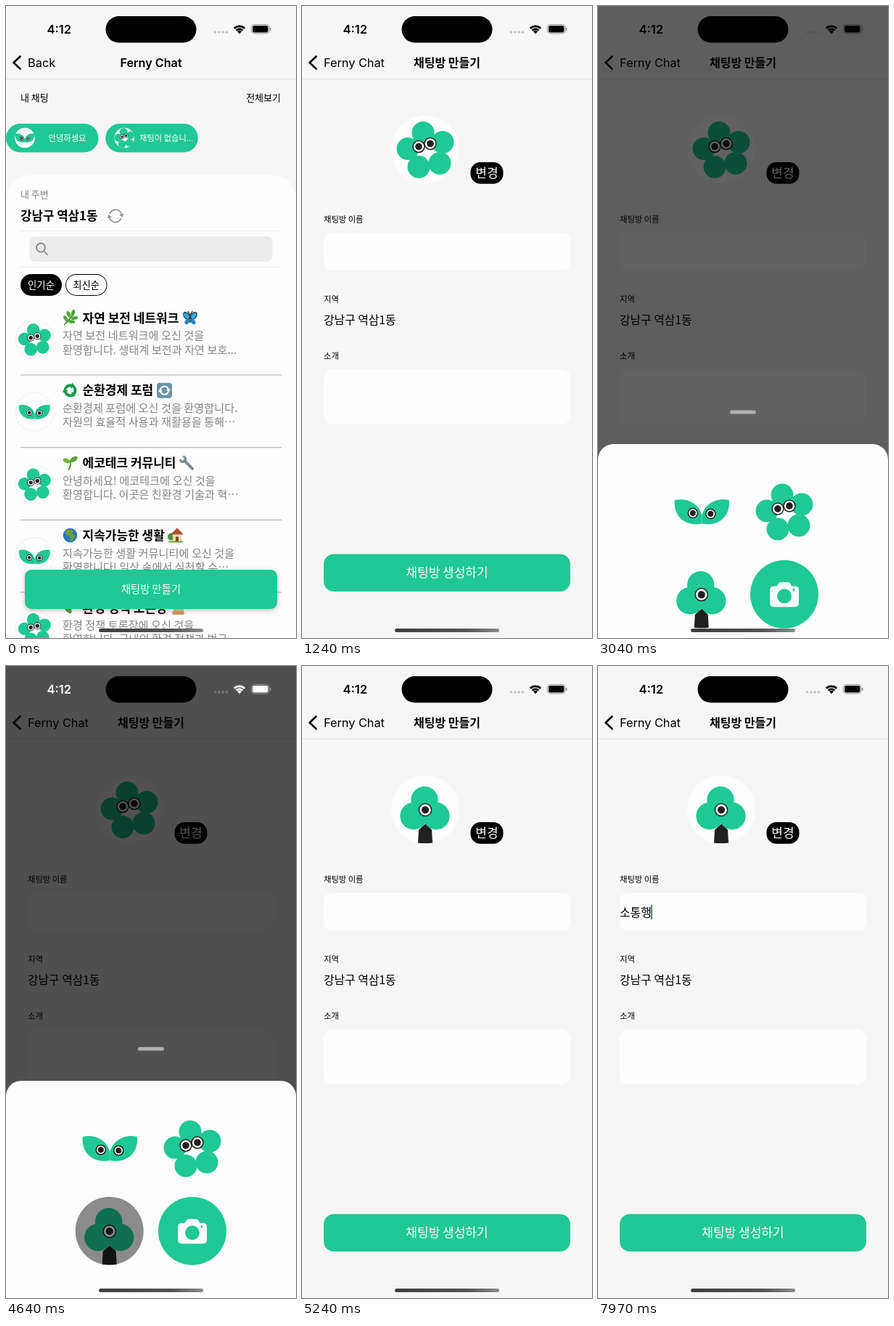
An HTML page with a canvas that plays this animation: 400x870 px, repeating every 8000 ms.

```html
<!DOCTYPE html>
<html lang="ko">
<head>
<meta charset="utf-8">
<title>Ferny Chat</title>
<style>
  html, body { margin: 0; width: 100%; height: 100%; overflow: hidden; background: #f6f6f6; }
  canvas { display: block; width: 400px; height: 870px; }
</style>
</head>
<body>
<canvas id="stage"></canvas>
<script>
const W = 400, H = 870, LOOP = 8000, STEP = 1000 / 15;
const BG = '#f6f6f6', PAPER = '#fdfdfd', GREEN = '#1fc894', GREY = '#868686', DARK = '#20201f';
const APP = 'Ferny Chat', PLACE = '강남구 역삼1동';
const KOREAN = '"Noto Sans CJK KR", "Noto Sans CJK JP", "Noto Sans CJK"';

const canvas = document.getElementById('stage');
const c = canvas.getContext('2d');
const ratio = window.devicePixelRatio || 1;
canvas.width = W * ratio;
canvas.height = H * ratio;

// ---------- helpers ----------
const clamp = v => Math.max(0, Math.min(1, v));
const ramp = (t, a, b) => clamp((t - a) / (b - a));
const mix = (a, b, p) => a + (b - a) * p;

// critically damped spring, 0 to 1
function spring(ms, speed) {
  const x = Math.max(0, ms) * speed / 1000;
  return 1 - (1 + x) * Math.exp(-x);
}

function group(x, y, draw, scale = 1, alpha = 1) {
  c.save();
  c.translate(x, y);
  c.scale(scale, scale);
  c.globalAlpha *= alpha;
  draw();
  c.restore();
}

function box(x, y, w, h, r, fill) {
  c.beginPath();
  c.roundRect(x, y, w, h, r);
  c.fillStyle = fill;
  c.fill();
}

function dot(x, y, r, fill) {
  c.beginPath();
  c.arc(x, y, r, 0, 7);
  c.fillStyle = fill;
  c.fill();
}

function oval(x, y, rx, ry, turn, fill) {
  c.beginPath();
  c.ellipse(x, y, rx, ry, turn, 0, 7);
  c.fillStyle = fill;
  c.fill();
}

function shape(d, fill) {
  c.fillStyle = fill;
  c.fill(new Path2D(d));
}

function stroke(d, color, width) {
  c.strokeStyle = color;
  c.lineWidth = width;
  c.lineCap = c.lineJoin = 'round';
  c.stroke(new Path2D(d));
}

function setFont(s, size, weight) {
  const fonts = /[ㄱ-힣]/.test(s) ? `${KOREAN}, Inter` : `Inter, ${KOREAN}`;
  c.font = `${weight} ${size}px ${fonts}, sans-serif`;
}

// y is the visual middle of the line
function text(s, x, y, size, color = '#000', weight = 400, align = 'left') {
  setFont(s, size, weight);
  c.textAlign = align;
  c.fillStyle = color;
  c.fillText(s, x, y + size * 0.37);
}

function arrows(count, r, color, width, head) {
  for (let i = 0; i < count; i++) {
    const span = 2 * Math.PI / count - 0.55;
    c.save();
    c.rotate(i * 2 * Math.PI / count - 2.8);
    c.beginPath();
    c.arc(0, 0, r, 0, span);
    c.strokeStyle = color;
    c.lineWidth = width;
    c.lineCap = 'butt';
    c.stroke();
    c.rotate(span);
    shape(`M${r - head} -.5 L${r + head} -.5 L${r} ${head * 1.3}Z`, color);
    c.restore();
  }
}

// ---------- characters, each around the centre of a 47 px circle ----------
function eye(x, y, r) {
  dot(x, y, r, DARK);
  dot(x, y, r - 1.5, '#fff');
  dot(x, y, r * 0.55, DARK);
}

function flower() {
  [[-3, -23], [24, -10], [20, 19], [-9, 24], [-24, -1]].forEach(([x, y]) => dot(x, y, 15.5, GREEN));
  eye(-9, -4, 8.7);
  eye(7, -8, 8.7);
}

function leaf() {
  const half = 'M-37.5 -16 C-20 -20 -4 -11 0 5 L0 16.5 C-20 21 -40 9 -37.5 -16Z';
  shape(half, GREEN);
  c.save();
  c.scale(-1, 1);
  shape(half, GREEN);
  c.restore();
  eye(-12.5, 2, 7.3);
  eye(12, 3, 7.3);
}

function tree() {
  [[-1, -13], [-16, 9], [15, 9]].forEach(([x, y]) => dot(x, y, 18.7, GREEN));
  dot(0, 2, 9, GREEN);
  shape('M0 20 L9 28 L10 46 Q0 47 -10 46 L-9 28Z', DARK);
  eye(0, 0.5, 9.3);
}

function camera() {
  dot(0, 0, 47, GREEN);
  box(-20, -11, 40, 28.5, 5, '#fff');
  shape('M-11 -10 L-8 -15 Q-7 -16.5 -5 -16.5 L5 -16.5 Q7 -16.5 8 -15 L11 -10Z', '#fff');
  dot(0, 2.5, 10, GREEN);
  dot(13, -6, 1.7, GREEN);
}

// ---------- small pictures beside the room names ----------
const icons = {
  herb() {
    stroke('M-8 9 Q-1 3 6 -8', '#3f8a2c', 1.6);
    [[-6, 1, 1], [-2, -5, 1.1], [4, -7, 1.9], [2, 5, 0.1], [6, 0, -0.2]]
      .forEach(([x, y, turn]) => oval(x, y, 4.8, 2.3, turn, '#4fa335'));
  },
  butterfly() {
    [-1, 1].forEach(s => {
      oval(s * 5, -3, 6.2, 4, s * -0.9, '#17344d');
      oval(s * 5, -3, 4.8, 2.8, s * -0.9, '#39a9e6');
      oval(s * 4, 5, 4.2, 2.9, s * 0.9, '#2784c4');
    });
    stroke('M0 -3 L0 6 M0 -4 L-3 -9 M0 -4 L3 -9', '#222', 1.3);
  },
  recycle() { arrows(3, 7, '#159a45', 4, 4); },
  renew() {
    box(-10.5, -10.5, 21, 21, 4, '#6b93a8');
    arrows(2, 5.6, '#fff', 2, 3);
  },
  sprout() {
    stroke('M-2 9 Q2 3 0 -2', '#5c9a2e', 2);
    oval(-5, -3, 5.2, 3, 0.4, '#6fb63a');
    oval(5, -5, 5.8, 3.2, -0.6, '#58a52f');
  },
  wrench() {
    stroke('M-3 -3 L8 8', '#788892', 4);
    c.beginPath();
    c.arc(-5, -5, 3.7, -1.2, 2.8);
    c.strokeStyle = '#788892';
    c.lineWidth = 3;
    c.stroke();
  },
  globe() {
    dot(0, 0, 9.8, '#2d78bd');
    shape('M-6 -7 Q0 -10 4 -6 L3 -2 L7 1 L3 8 L0 7 L-1 1 L-6 0Z', '#6aa23c');
  },
  home() {
    dot(-6, 2, 5, '#4c963a');
    box(-4, -2, 12, 11, 0, '#efdaae');
    shape('M-7 -1 L2 -10 L11 -1Z', '#a8522d');
    box(0, 2, 4, 7, 0, '#7b482d');
    box(-10, 8, 20, 2, 1, '#67a440');
  },
  leaves() {
    oval(-3, 2, 7, 3.6, 0.9, '#5c9f36');
    oval(5, -4, 5, 2.6, -0.7, '#79b94c');
  },
  scroll() {
    box(-7, -9, 14, 18, 2, '#e5c58e');
    box(-9, 5, 17, 4.5, 2, '#c69a5d');
    stroke('M-4 -5 H4 M-4 -1 H4', '#9b7442', 1);
  }
};

const rooms = [
  ['herb', '자연 보전 네트워크', 'butterfly', 254, '자연 보전 네트워크에 오신 것을', '환영합니다. 생태계 보전과 자연 보호...'],
  ['recycle', '순환경제 포럼', 'renew', 218.5, '순환경제 포럼에 오신 것을 환영합니다.', '자원의 효율적 사용과 재활용을 통해⋯'],
  ['sprout', '에코테크 커뮤니티', 'wrench', 249, '안녕하세요! 에코테크에 오신 것을', '환영합니다. 이곳은 친환경 기술과 혁⋯'],
  ['globe', '지속가능한 생활', 'home', 234, '지속가능한 생활 커뮤니티에 오신 것을', '환영합니다! 일상 속에서 실천할 수⋯'],
  ['leaves', '환경 정책 토론장', 'scroll', 238, '환경 정책 토론장에 오신 것을', '환영합니다. 국내외 환경 정책과 법규⋯']
];

// ---------- screens ----------
function chatPill(x, face, scale, label, labelX) {
  box(x, 162, 127.5, 39.5, 19.7, GREEN);
  group(x + 26, 181.5, () => {
    c.beginPath();
    c.arc(0, 0, 14, 0, 7);
    c.clip();
    dot(0, 0, 14, PAPER);
    c.scale(scale, scale);
    face();
  });
  text(label, labelX, 182, 11.3, '#fff');
}

function roomRow([left, name, right, rightX, line1, line2], i) {
  const y = 429.5 + i * 99.7;
  group(39.3, y + 29.5, () => {
    dot(0, 0, 47, '#e9e9e9');
    dot(0, 0, 46, PAPER);
    (i % 2 ? leaf : flower)();
  }, 0.57);
  group(88.5, y, icons[left]);
  text(name, 105.5, y, 17, '#000', 700);
  group(rightX, y, icons[right]);
  text(line1, 78, y + 24.3, 15.2, GREY);
  text(line2, 78, y + 43.5, 15.2, GREY);
  box(20, y + 78, 360, 1, 0, '#a9a9a9');
}

function listScreen(pressed) {
  box(0, 0, W, H, 0, BG);
  text('내 채팅', 20, 126, 13, '#000', 500);
  text('전체보기', 379, 126, 13, '#000', 500, 'right');
  chatPill(0, leaf, 0.36, '안녕하셍요', 58.5);
  chatPill(137.3, flower, 0.35, '채팅이 없습니...', 184);

  box(0, 233, W, 700, 32, PAPER);
  text('내 주변', 20, 259.5, 13, GREY);
  text(PLACE, 20, 289, 16.8, '#000', 700);
  group(151, 289, () => arrows(2, 8.6, '#8d8d8d', 1.5, 3));
  box(20, 309, 360, 1, 0, '#ececec');
  box(20, 359, 360, 1, 0, '#ececec');
  box(32.5, 317, 335, 35, 8, '#ececec');
  stroke('M53.2 338.5 L57 342.3 M54 332.6 A6 6 0 1 1 42 332.6 A6 6 0 1 1 54 332.6', '#7f7f7f', 1.6);
  box(20, 369, 57, 30, 15, '#000');
  text('인기순', 48.5, 384, 13.4, '#fff', 400, 'center');
  box(82, 369, 57.5, 30, 15, '#000');
  box(83, 370, 55.5, 28, 14, PAPER);
  text('최신순', 110.7, 384, 13.4, '#000', 400, 'center');
  rooms.forEach(roomRow);

  c.save();
  c.shadowColor = 'rgba(0,0,0,.25)';
  c.shadowBlur = 6 * ratio;
  c.shadowOffsetY = 2 * ratio;
  box(26, 776, 348, 54, 9, GREEN);
  c.restore();
  text('채팅방 만들기', 200, 803, 14.3, '#fff', 400, 'center');
  if (pressed) box(26, 776, 348, 54, 9, 'rgba(0,0,0,.4)');
}

function formScreen(face, typed, caret) {
  box(0, 0, W, H, 0, BG);
  group(170, 197.5, () => {
    dot(0, 0, 47, PAPER);
    face();
  });
  box(232.5, 215, 45, 29.7, 13.5, '#000');
  text('변경', 255, 230, 17, '#fff', 400, 'center');

  text('채팅방 이름', 30, 294, 11.3, '#000', 500);
  box(30, 312, 340, 52, 11, PAPER);
  text(typed, 30, 339, 15.9);
  if (caret > 0) {
    setFont(typed || '소', 15.9, 400);
    const x = 29.5 + c.measureText(typed).width;
    c.globalAlpha = caret;
    box(x - 0.5, 328.5, 2, 20.5, 1, '#3c6fd6');
    c.globalAlpha = 1;
  }
  text('지역', 30, 403.5, 11.3, '#000', 500);
  text(PLACE, 30, 432.5, 15.8);
  text('소개', 30, 481.5, 11.3, '#000', 500);
  box(30, 500, 340, 76, 12, PAPER);
  box(30, 754.5, 340, 51.5, 14, GREEN);
  text('채팅방 생성하기', 200, 780, 17, '#fff', 400, 'center');
}

function navBar(p) {
  box(0, 0, W, 100, 0, BG);
  box(0, 99.7, W, 1, 0, '#dedede');
  stroke('M19.5 69.5 L10.5 78 L19.5 86.5', '#000', 2.6);
  group(-70 * p, 0, () => text('Back', 30, 78, 16.4), 1, clamp(1 - 2 * p));
  const slide = -130 * p;
  group(slide, 0, () => text(APP, 200, 78, 16.2, '#000', 600, 'center'), 1, clamp(1 - 1.6 * p));
  group(130 + slide, 0, () => text(APP, 30, 78, 16.3), 1, clamp(1.8 * p - 0.8));
  group(170 * (1 - p), 0, () => text('채팅방 만들기', 200, 78, 16, '#000', 700, 'center'), 1, clamp(1.5 * p - 0.5));
}

function pickSheet(p, pressed) {
  const top = mix(914, 571, p);
  box(0, 0, W, H, 0, `rgba(0,0,0,${0.68 * p})`);
  box(182, top - 46.5, 36, 5, 2.5, '#b1b1b1');
  box(0, top, W, H, 21, PAPER);
  group(143.3, top + 93, leaf);
  group(257, top + 93, flower);
  group(142.7, top + 206.7, () => {
    tree();
    if (pressed > 0) dot(0, 0, 47, `rgba(0,0,0,${0.45 * pressed})`);
  });
  group(257, top + 206.7, camera);
}

function statusBar(light) {
  const v = Math.round(255 * light);
  const ink = `rgb(${v},${v},${v})`;
  text('4:12', 56.5, 32, 16.6, ink, 600);
  box(137.5, 14, 125, 36.5, 18.2, '#000');
  for (let i = 0; i < 4; i++) dot(288.5 + i * 5.3, 36, 1.8, light > 0.5 ? '#777' : 'rgba(60,60,60,.28)');

  c.strokeStyle = ink;
  c.lineWidth = 2.7;
  c.lineCap = 'butt';
  [6.2, 10.2].forEach(r => {
    c.beginPath();
    c.arc(322, 38, r, -2.36, -0.78);
    c.stroke();
  });
  shape('M322 38.5 L319 35 Q322 32.4 325 35Z', ink);

  c.globalAlpha = 0.4;
  c.lineWidth = 1;
  c.beginPath();
  c.roundRect(338.5, 25.5, 24.5, 12.5, 4);
  c.stroke();
  box(364, 29.7, 1.6, 4.4, 0.8, ink);
  c.globalAlpha = 1;
  box(340, 27, 21.5, 9.5, 2.7, ink);
}

function homeBar() {
  const shade = c.createLinearGradient(128, 0, 272, 0);
  shade.addColorStop(0, '#3d3d3d');
  shade.addColorStop(0.7, '#555');
  shade.addColorStop(1, '#8c8c8c');
  box(128, 857, 144, 5, 2.5, shade);
}

// ---------- timeline ----------
const keys = [
  [7040, 'ㅅ'], [7170, '소'], [7300, '솥'], [7500, '소토'],
  [7640, '소통'], [7770, '소통ㅎ'], [7840, '소통해'], [7970, '소통행']
];

function typedAt(t) {
  return keys.reduce((s, [at, value]) => t >= at ? value : s, '');
}

function caretAt(t) {
  if (t < 6400) return ramp(t, 5570, 5700) * (1 - ramp(t, 6170, 6366));
  return ramp(t, 6434, 6566);
}

function render(clock) {
  // the screen is refreshed fifteen times a second
  const t = Math.floor((clock - 33) / STEP) * STEP + 33.4;
  const push = t > 1200 ? 1 : spring(t - 600, 16);
  const sheet = t > 5230 ? 0 : spring(t - 2851.2, 21.8) * (1 - spring(t - 4740, 21.8));
  const face = t < 4690 ? flower : tree;
  const light = ramp(t, 3080, 3300) * (1 - ramp(t, 4760, 4980));

  c.setTransform(ratio, 0, 0, ratio, 0, 0);
  if (push < 1) {
    group(-120 * push, 0, () => listScreen(t >= 500 && t < 700));
    if (push > 0) box(0, 0, W, H, 0, `rgba(0,0,0,${0.1 * push})`);
  }
  if (push > 0) group(W * (1 - push), 0, () => formScreen(face, typedAt(clock), caretAt(t)));
  navBar(push);
  if (sheet > 0) pickSheet(sheet, t > 4630 ? 1 - ramp(t, 4690, 4850) : 0);
  statusBar(light);
  homeBar();
}

const start = performance.now();
function tick() {
  render((performance.now() - start) % LOOP);
  requestAnimationFrame(tick);
}
tick();
</script>
</body>
</html>
```
